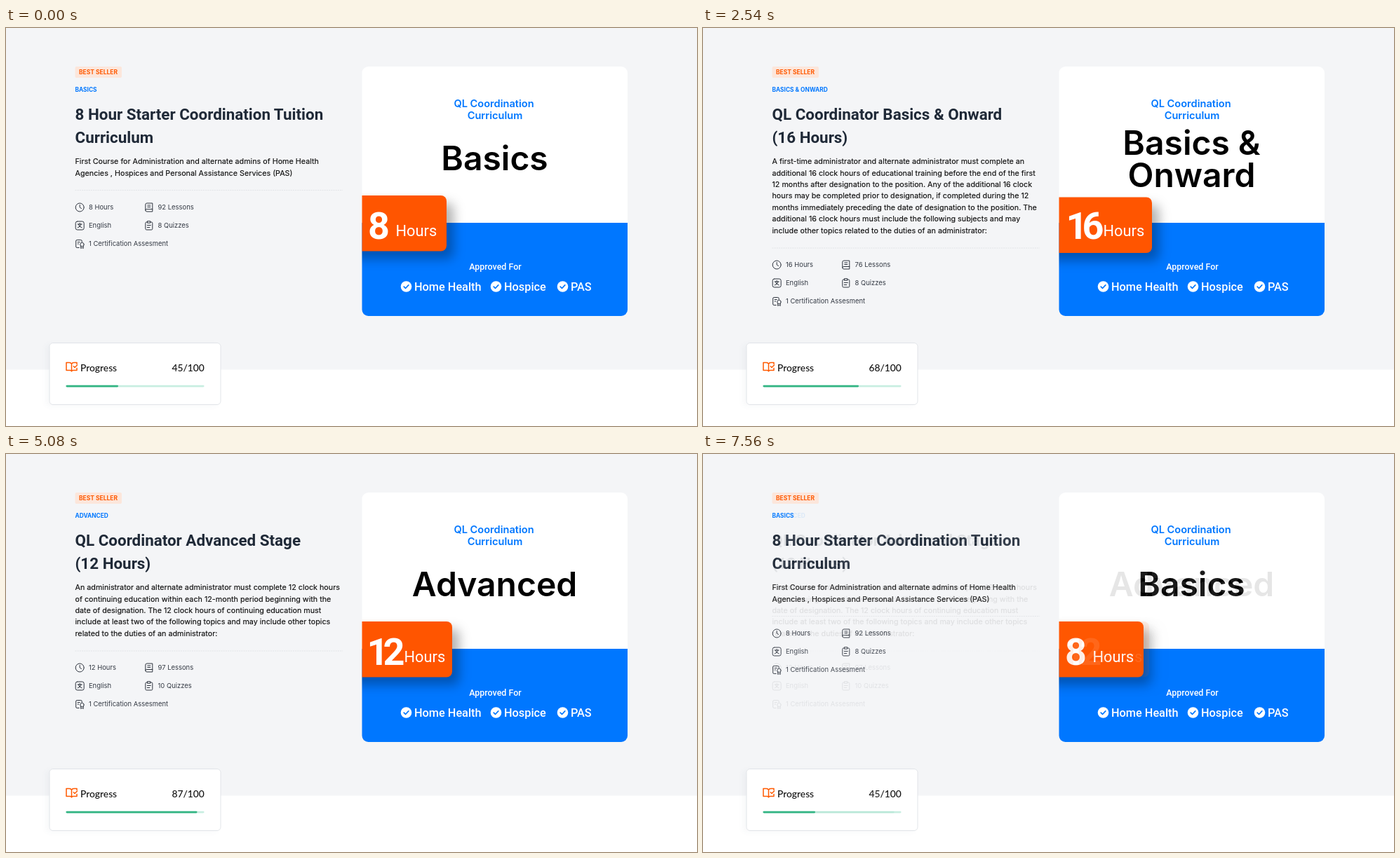
An HTML page that plays this animation: 985 px wide and 568 px high, repeating every 7620 ms.

```html
<!DOCTYPE html>
<html lang="en">
<head>
<meta charset="utf-8">
<title>Course cards</title>
<style>
  html, body { margin: 0; width: 100%; height: 100%; overflow: hidden; background: #fff; }
  svg { display: block; }
  text { font-family: Inter, sans-serif; white-space: pre; }
  .roboto { font-family: Roboto, sans-serif; }
  .lato { font-family: Lato, sans-serif; font-weight: 500; }
  .title { font-family: Roboto, sans-serif; font-weight: 600; fill: #1f2937; }
  .body { stroke: #111; stroke-width: .15; }
  .tag { font-weight: 700; }
  .mid { text-anchor: middle; }
  .end { text-anchor: end; }
  .line { fill: none; stroke: #2d333d; stroke-linecap: round; stroke-linejoin: round; }
  .panel { filter: drop-shadow(-5px 2px 3px rgba(40, 60, 90, .03)); }
  .badge { fill: #ff5500; filter: drop-shadow(10px 11px 8px rgba(0, 0, 0, .3)); }
  #scenes { isolation: isolate; }
  .scene { mix-blend-mode: plus-lighter; }
</style>
</head>
<body>
<svg width="985" height="568" viewBox="0 0 985 568">
  <defs><clipPath id="card"><rect x="507.5" y="55" width="378.5" height="356" rx="9"/></clipPath></defs>
  <g id="base"></g>
  <g id="scenes"></g>
</svg>
<script>
const HOLD = 2000, STEP = 60, CYCLE = 2540;
const BLUE = '#0077ff', ORANGE = '#ff5a00';

const courses = [
  {
    level: 'BASICS', big: ['Basics'],
    title: ['8 Hour Starter Coordination Tuition', 'Curriculum'],
    body: ['First Course for Administration and alternate admins of Home Health',
      'Agencies , Hospices and Personal Assistance Services (PAS)'],
    rule: 231.5, meta: 256, hours: 8, lessons: 92, quizzes: 8,
    done: 45, barEnd: 159, badge: [628, 239, 516, 555.5]
  },
  {
    level: 'BASICS & ONWARD', big: ['Basics &', 'Onward'],
    title: ['QL Coordinator Basics & Onward', '(16 Hours)'],
    body: ['A first-time administrator and alternate administrator must complete an',
      'additional 16 clock hours of educational training before the end of the first',
      '12 months after designation to the position. Any of the additional 16 clock',
      'hours may be completed prior to designation, if completed during the 12',
      'months immediately preceding the date of designation to the position. The',
      'additional 16 clock hours must include the following subjects and may',
      'include other topics related to the duties of an administrator:'],
    rule: 314, meta: 338, hours: 16, lessons: 76, quizzes: 8,
    done: 68, barEnd: 221, badge: [640, 241.5, 517.5, 570.5]
  },
  {
    level: 'ADVANCED', big: ['Advanced'],
    title: ['QL Coordinator Advanced Stage', '(12 Hours)'],
    body: ['An administrator and alternate administrator must complete 12 clock hours',
      'of continuing education within each 12-month period beginning with the',
      'date of designation. The 12 clock hours of continuing education must',
      'include at least two of the following topics and may include other topics',
      'related to the duties of an administrator:'],
    rule: 281, meta: 305, hours: 12, lessons: 97, quizzes: 10,
    done: 87, barEnd: 271.5, badge: [636, 239, 514.5, 567.5]
  }
];

// Icons are drawn around their own centre.
const icons = {
  clock: 'M6 0A6 6 0 1 1-6 0A6 6 0 1 1 6 0M0-3.5V0L2.3 1.5',
  lesson: 'M-5 4V-4Q-5-6-3-6H5V6H-3Q-5 6-5 4Q-5 2.5-3 2.5H5M-2-3H2M-2-.5H2',
  language: 'M-3.5-6H3.5Q6-6 6-3.5V3.5Q6 6 3.5 6H-3.5Q-6 6-6 3.5V-3.5Q-6-6-3.5-6M-3-2H3M0-3.5V-2M2-2Q1 2-3 3M-2-2Q-1 2 3 3',
  quiz: 'M-2-5H-3.5Q-5-5-5-3.5V4.5Q-5 6-3.5 6H3.5Q5 6 5 4.5V-3.5Q5-5 3.5-5H2M-2-6.3H2V-3.8H-2ZM-2.5-.5H2.5M-2.5 2.5H1',
  award: 'M-1 5.5H-4Q-5.5 5.5-5.5 4V-4Q-5.5-5.5-4-5.5H1.5Q3-5.5 3-4V-2.5M-3-2.5H0M-3 0H-1.5M6 1A2.7 2.7 0 1 1 .6 1A2.7 2.7 0 1 1 6 1M1.5 3.3V6.5L3.3 5.5L5 6.5V3.3',
  book: 'M0-4Q-1-6-3-6H-7.5V5H-2.5Q0 5 0 6.5Q0 5 2.5 5H7.5V2M0-4V6M0-4Q1-6 3-6H7.5V-4M2.8-.8L4.5 1L8-2.5'
};

const esc = s => String(s).replace(/&/g, '&amp;');
const text = (x, y, size, str, cls = '', fill = '#111') =>
  `<text x="${x}" y="${y}" font-size="${size}" class="${cls}" fill="${fill}">${esc(str)}</text>`;
const rect = (x, y, w, h, fill, extra = '') =>
  `<rect x="${x}" y="${y}" width="${w}" height="${h}" fill="${fill}" ${extra}/>`;
const icon = (x, y, name, style = '') =>
  `<path class="line" transform="translate(${x} ${y})" d="${icons[name]}" style="${style}"/>`;
const meta = (x, y, name, label) =>
  icon(x, y, name) + text(x + 12.7, y + 3.4, 9.45, label, '', '#343a44');
const bold = (x, y, size, str, fill) =>
  `<text x="${x}" y="${y}" font-size="${size}" font-weight="600" fill="${fill}" class="mid">${esc(str)}</text>`;
const approval = (x, label) =>
  `<circle cx="${x}" cy="369" r="7.8" fill="#fff"/>
   <path class="line" d="M${x - 3.3} 369.2l2.3 2.3 4.3-4.6" style="stroke:${BLUE};stroke-width:1.7"/>` +
  `<g font-weight="500">${text(x + 11.5, 374.5, 16.3, label, 'roboto', '#fff')}</g>`;

function baseMarkup() {
  return rect(0, 0, 985, 487.5, '#f4f5f7') +
    rect(98.5, 55, 66.5, 16, '#fce6db', 'rx="2"') +
    text(104, 65.8, 8.5, 'BEST SELLER', 'tag', ORANGE) +
    `<g clip-path="url(#card)">${rect(507, 55, 380, 224, '#fff')}${rect(507, 278, 380, 134, BLUE)}</g>` +
    bold(695.5, 113, 14.6, 'QL Coordination', BLUE) +
    bold(697, 129.7, 14.6, 'Curriculum', BLUE) +
    `<g font-weight="500">${text(697.5, 345, 12.5, 'Approved For', 'roboto mid', '#fff')}</g>` +
    approval(570.5, 'Home Health') + approval(698.5, 'Hospice') + approval(793.5, 'PAS') +
    rect(62, 449.5, 244, 88, '#fff', 'rx="5" stroke="#e1e4e8" class="panel"') +
    icon(93.5, 483.5, 'book', `stroke:${ORANGE};stroke-width:1.5`) +
    text(106, 489.5, 13.8, 'Progress', 'lato') +
    rect(85.5, 509.7, 197, 2.7, '#c8eee1', 'rx="1.3"');
}

function sceneMarkup(c) {
  const [right, top, numX, hoursX] = c.badge;
  const bigY = c.big.length > 1 ? 180.5 : 202.5;
  return `<g class="scene">` +
    text(98.5, 91, 8.35, c.level, 'tag', BLUE) +
    c.title.map((s, i) => text(98.5, 131 + 33 * i, 22.4, s, 'title')).join('') +
    c.body.map((s, i) => text(98.5, 194.2 + 16.42 * i, 10.76, s, 'body')).join('') +
    `<path d="M98.5 ${c.rule}H480" stroke="#dde0e4" stroke-width=".8" stroke-dasharray="2 1.2"/>` +
    meta(105.2, c.meta, 'clock', c.hours + ' Hours') +
    meta(203.8, c.meta, 'lesson', c.lessons + ' Lessons') +
    meta(105.2, c.meta + 26, 'language', 'English') +
    meta(203.8, c.meta + 26, 'quiz', c.quizzes + ' Quizzes') +
    meta(105.2, c.meta + 52, 'award', '1 Certification Assesment') +
    c.big.map((s, i) => bold(696.5, bigY + 46.5 * i, 48, s, '#000')).join('') +
    `<g clip-path="url(#card)">${rect(480, top, right - 480, 79.5, '#ff5500', 'rx="8" class="badge"')}</g>` +
    `<g font-weight="600" letter-spacing="-8">${text(numX, 300.7, 54, c.hours, 'roboto', '#fff')}</g>` +
    text(hoursX, 296.7, 21.8, 'Hours', 'roboto', '#fff') +
    text(282.7, 489.5, 13.8, c.done + '/100', 'lato end') +
    rect(85.5, 509.7, c.barEnd - 84.5, 2.7, '#33b583', 'rx="1.3"') +
    `</g>`;
}

document.getElementById('base').innerHTML = baseMarkup();
const holder = document.getElementById('scenes');
holder.innerHTML = courses.map(sceneMarkup).join('');
const scenes = [...holder.children];

function draw() {
  const t = performance.now() % (CYCLE * scenes.length);
  const now = Math.floor(t / CYCLE), next = (now + 1) % scenes.length;
  const since = t % CYCLE - HOLD;
  // The dissolve advances a tenth per step.
  const mix = since < 0 ? 0 : (Math.floor(since / STEP) + 1) / 10;
  scenes.forEach((g, i) => {
    const alpha = i === now ? 1 - mix : i === next ? mix : 0;
    g.style.opacity = alpha;
    g.style.display = alpha ? '' : 'none';
  });
  requestAnimationFrame(draw);
}
draw();
</script>
</body>
</html>
```
